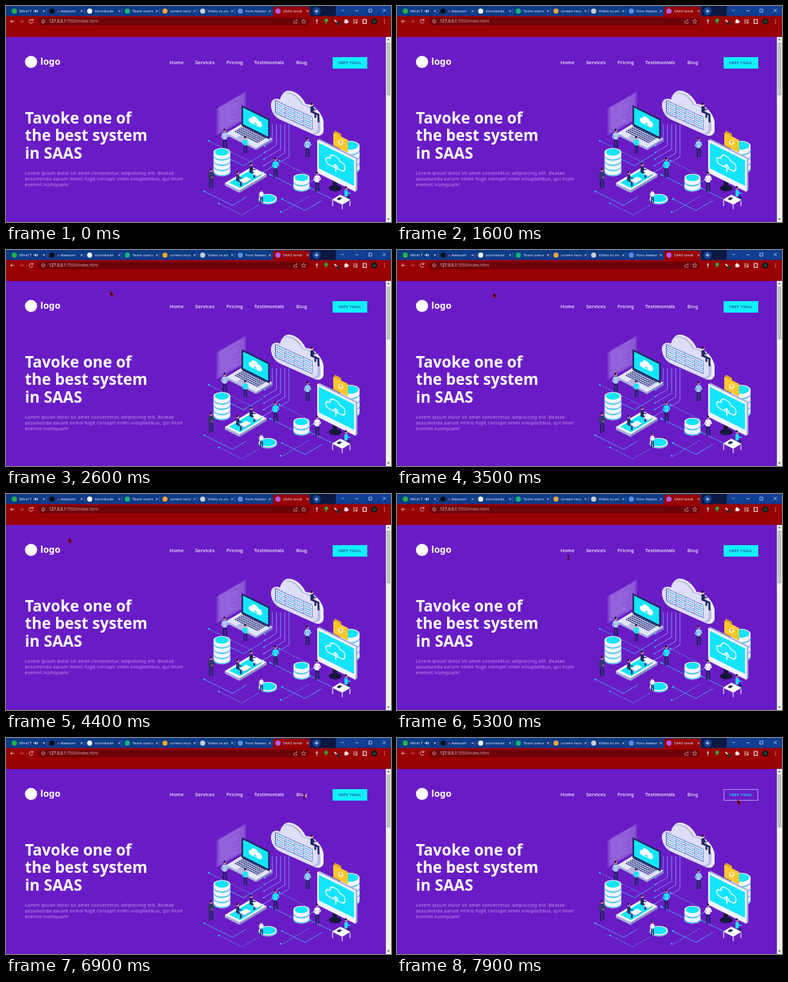
Write an HTML page that moves like this. It is 600 px wide and 338 px high and loops after 8 s.

```html
<!DOCTYPE html>
<html lang="en">
<head>
<meta charset="utf-8">
<title>SAAS landing page</title>
<style>
  html, body { margin: 0; width: 100%; height: 100%; overflow: hidden; background: #691cc5; }
  svg { display: block; width: 100%; height: 100%; font-family: "Noto Sans", "Open Sans", sans-serif; }
  .tab { font-size: 6px; fill: #dce6fb; }
  .nav { font-size: 7.2px; letter-spacing: .35px; fill: #fff; stroke: #fff; stroke-width: .15px; }
  .nav.on { fill: #14e4fa; stroke: #14e4fa; text-decoration: underline; }
  .logo { font-size: 14.4px; font-weight: 700; fill: #fff; }
  .title { font-size: 24.1px; font-weight: 700; fill: #fff; }
  .lorem { font-size: 7.2px; letter-spacing: .3px; fill: #c596ec; }
  .cta rect { fill: #10effb; stroke: #10effb; }
  .cta text { font-size: 6px; letter-spacing: .5px; fill: #24206e; }
  .cta.on rect { fill: none; stroke: #bba0ee; }
  .cta.on text { fill: #14e4fa; stroke: #14e4fa; stroke-width: .2px; }
</style>
</head>
<body>
<svg id="stage" viewBox="0 0 600 338" preserveAspectRatio="none"></svg>
<script>
const CYAN = '#14e4fa', NAVY = '#20245e', WHITE = '#f4f6ff', SHADE = '#a8acdc', RED = '#980002', ICON = '#ecd4d4';

// ---------- drawing helpers ----------
const poly = (points, fill) => `<polygon points="${points.join(' ')}" fill="${fill}"/>`;
const line = (d, stroke, w = 1, extra = '') => `<path d="${d}" fill="none" stroke="${stroke}" stroke-width="${w}" ${extra}/>`;
const rect = (x, y, w, h, fill, extra = '') => `<rect x="${x}" y="${y}" width="${w}" height="${h}" fill="${fill}" ${extra}/>`;
const dot = (x, y, r, fill) => `<circle cx="${x}" cy="${y}" r="${r}" fill="${fill}"/>`;
const oval = (x, y, rx, fill) => `<ellipse cx="${x}" cy="${y}" rx="${rx}" ry="${rx * .5}" fill="${fill}"/>`;
const text = (x, y, str, cls) => `<text x="${x}" y="${y}" class="${cls}">${str}</text>`;
const group = (transform, s) => `<g transform="${transform}">${s}</g>`;
const cross = (x, y, r, color) => line(`M${x - r} ${y - r}l${2 * r} ${2 * r}m0 ${-2 * r}l${-2 * r} ${2 * r}`, color, .8);
const range = (n, f) => Array.from({ length: n }, (_, i) => f(i)).join('');

let seed = 7;
const random = () => (seed = seed * 16807 % 2147483647) / 2147483647;

// Isometric floor: "down" runs right and down, "up" runs right and up
const DOWN = .5, UP = -.6;
const wall = (x, y, w, h, fill, slope = DOWN) =>
  poly([[x, y], [x + w, y + w * slope], [x + w, y + w * slope + h], [x, y + h]], fill);
const tile = (x, y, down, up, fill) =>
  poly([[x, y], [x + up, y + up * UP], [x + up + down, y + up * UP + down * DOWN], [x + down, y + down * DOWN]], fill);
const slab = (x, y, down, up, h, fill) =>
  wall(x, y, down, h, SHADE) + wall(x + down, y + down * DOWN, up, h, '#8d93ca', UP) + tile(x, y, down, up, fill);

// ---------- browser window ----------
function tabStrip() {
  const pitch = 58.7;
  const tabs = [['#23b24b', 'Mirel T'], ['#0b0b10', '<tspan fill="#d23c9d">●</tspan> Awesom'], ['#f2f4f8', 'tolvinkeda'],
    ['#19b27c', 'Team overv'], ['#e8a33a', 'screen reco'], ['#c9cdd4', 'Video to an'], ['#5b8de8', 'Font Aweso'], ['#b65ce8', 'SAAS landi']];
  const active = tabs.length - 1;
  return rect(0, 0, 600, 15.5, '#0d3b86') + rect(474, 0, 40, 15.5, '#0c1840') + rect(514, 0, 86, 13, '#113f94') +
    rect(416, 1, 57, 16, RED, 'rx="3"') +
    tabs.map(([color, name], i) => {
      const x = 13 + i * pitch;
      return dot(x, 8, 4, color) + text(x + 7.8, 10.4, name, 'tab') + cross(x + 46, 8, 1.5, '#dbe3f5') +
        (i < active - 1 ? rect(x + 50, 4, .6, 8, '#5575ad') : '');
    }).join('') +
    line('M43 8h1.500l2-2v4l-2-2M48.500 6q1.500 2 0 4', WHITE) +
    dot(484, 8, 6.5, '#104292') + line('M481 8h6m-3-3v6', WHITE) +
    line('M522.500 6l2 2 2-2M544.500 7.500h5M565.500 5h4.500v4.500h-4.500z', '#dfe8fa', .8) + cross(589.5, 7, 2.3, '#dfe8fa');
}

function toolbar() {
  return rect(0, 15.5, 600, 33, RED) + rect(50, 18.5, 422, 11.5, '#6d0208', 'rx="5.7"') +
    line('M13 24h-6m2.500-2.500l-2.500 2.500 2.500 2.500M41.500 22a3 3 0 1 0 .5 3M42 20v2.500h-2.500', ICON, .9) +
    line('M21 24h6m-2.500-2.500l2.500 2.500-2.500 2.500', '#c46b6b', .9) +
    line('M55.500 24a2.500 2.500 0 1 0 5 0a2.500 2.500 0 1 0-5 0m2.500-.5v2', ICON, .7) +
    '<text x="67" y="26.4" font-size="6.3" fill="#fff">127.0.0.1<tspan fill="#d2a3a5">:5500/index.html</tspan></text>' +
    line('M448.500 23v4h5v-2M450 25q0-3 4-3m-1.500-1.500l1.500 1.500-1.500 1.500', '#d8b2b4', .7) +
    line('M464 20.500l1 2.500h2.500l-2 1.800.7 2.500-2.200-1.500-2.200 1.500.7-2.500-2-1.800h2.500z', '#d8b2b4', .7) +
    rect(483, 20.5, 3, 5, '#b9a3b5', 'rx="1.5"') + line('M484.500 26v2.500', '#ddd', .8) +
    dot(499, 22.5, 2.8, '#36a83b') + line('M499 24v4', '#36a83b', 1.5) +
    line('M512 22l5 5', '#f0e8e8', 1.8) + rect(514.5, 25, 6, 4.5, '#2b2830', 'rx="1"') +
    rect(527.5, 22, 5, 5, WHITE, 'rx=".6"') + dot(530, 21.7, 1.2, WHITE) + dot(532.8, 24.5, 1.2, WHITE) +
    line('M541 22h5m-5 2.500h3.500m-3.500 2.500h2.500M547 21v5', ICON) + dot(546, 26.3, 1.2, ICON) +
    line('M556.500 21h5v6.500h-5z', WHITE, 1.2) + dot(574, 24.3, 4.7, '#16181a') + dot(574, 24.3, 2, '#22553f') +
    range(3, i => dot(590, 21.8 + i * 2.5, .7, ICON));
}

function scrollbar() {
  const arrow = (y, dir) => poly([[594, y], [598, y], [596, y + 2.5 * dir]], '#505050');
  return rect(592, 48.5, 8, 290, '#f1f1f1') + rect(593, 57, 6, 83, '#c1c1c1') + arrow(53.5, -1) + arrow(332.5, 1);
}

// ---------- illustration ----------
function head(x, y) {
  return dot(x, y, 2.2, '#f1b49b') + dot(x - .5, y - 1.2, 1.9, '#24183f');
}

// Standing figure, feet at (x, y)
function person(x, y, shirt, scale = 1) {
  return group(`translate(${x} ${y}) scale(${scale})`,
    line('M-1.700-16L-2 0M1.700-16L2.500-1', NAVY, 2.5) + rect(-3, -26, 6, 11, shirt, 'rx="1"') +
    line('M-3-25l-2 6 3 2.500M3-25l2 5-3 2', shirt, 1.7) + dot(1.8, -18, .9, '#f1b49b') + head(0, -29));
}

function seated(x, y, shirt) {
  return line(`M${x} ${y - 5}l5 2v7`, NAVY, 2.6) + rect(x - 2.5, y - 14, 5, 10, shirt, 'rx="1"') +
    line(`M${x + 1} ${y - 13}l2 4h4`, shirt, 1.7) + head(x, y - 17);
}

// Stack of discs standing on (x, y)
function drum(x, y, rx, layers, step) {
  return range(layers, i => {
    const top = y - rx / 2 - (i + 1) * step, arc = `a${rx} ${rx / 2} 0 0 0 ${2 * rx} 0`;
    return `<path d="M${x - rx} ${top}v${step - 1.5}${arc}v${1.5 - step}z" fill="${WHITE}"/>` +
      line(`M${x - rx} ${top + step - 2.5}${arc}`, '#4cbdea', 1.6) + oval(x, top, rx, WHITE) + oval(x, top, rx - 2, CYAN);
  });
}

function cloudMark(x, y, scale, fill) {
  return group(`translate(${x} ${y}) scale(${scale}) skewY(26)`,
    `<path d="M-7 5q-5 0-5-4t5-4q0-6 6-6 5 0 6 4 6-1 6 4 0 6-5 6z" fill="${fill}" stroke="#fff" stroke-width="1.2"/>` +
    line('M0 1v9M-3 4l3-3 3 3', fill === 'none' ? '#fff' : CYAN, 1.2));
}

// Floor trace: alternating down and up legs from (x, y)
function trace(x, y, legs, dashed) {
  const d = legs.map((n, i) => `l${n} ${n * (i % 2 ? UP : DOWN)}`).join('');
  return line(`M${x} ${y}${d}`, '#4fb6f2', .9, dashed ? 'stroke-dasharray="3 1.8"' : '') + dot(x, y, 1.2, CYAN);
}

function floor() {
  return trace(316, 211, [68], true) + trace(309, 290, [44, 22]) + trace(332, 309, [36, 26], true) +
    trace(412, 264, [44, 24]) + trace(426, 242, [46], true) + trace(430, 302, [36, 26]) +
    trace(428, 322, [2, 42], true) + trace(474, 285, [34]) + trace(346, 238, [24, 30]);
}

const pipes = () => range(5, i => {
  const x = 415 + i * 6.5, end = 212 + i * 6, back = 12 + i * 7;
  return line(`M${x} 185V${end}l${-back} ${-back * UP}`, '#7d8ff0', 1) + dot(x - back, end - back * UP, 1.1, CYAN);
});

function cloud() {
  const puffs = rect(2, -28, 81, 31, 'inherit', 'rx="14"') +
    [[15, -14, 14], [37, -30, 20], [63, -21, 20]].map(([x, y, r]) => dot(x, y, r, 'inherit')).join('');
  const layer = (fill, scale) => `<g fill="${fill}" transform="scale(${scale})">${puffs.replaceAll('fill="inherit"', '')}</g>`;
  return group('translate(412 168) skewY(24)',
    layer('#eef0fd', 1) + layer('#b9bbe6', .94) + layer('#dcdff6', .89) + rect(7, -24, 59, 21, '#7f86d6', 'rx="2"') +
    range(12, i => {
      const x = 9 + i % 4 * 14.3, y = -22.5 + Math.floor(i / 4) * 6.3;
      return rect(x, y, 13, 5.2, WHITE) + line(`M${x + 1} ${y + 2.6}h11`, '#2a9fe2', 2, 'stroke-dasharray="2 .8"');
    }));
}

const hologram = () => range(2, i => `<g opacity=".25">${wall(331 - i * 3, 158 + i * 3, 43, 42, '#b9a4ee', -.57)}</g>`) +
  range(13, i => {
    const x = 332 + random() * 4, w = 14 + random() * 20;
    return line(`M${x} ${161 + i * 2.8 - (x - 332) * .57}l${w} ${-w * .57}`, '#a98be6', .8, 'stroke-dasharray="5 1 3 1.5"');
  });

function laptop() {
  return slab(343, 199, 47, 25, 3, '#e2e5f8') + tile(355, 196, 38, 15, '#c3c8ec') +
    range(5, i => {
      const x = 357 + i * 3, y = 196 + i * 3 * UP;
      return line(`M${x} ${y}l36 18`, '#2b3070', 1.6, 'stroke-dasharray="2.4 .7"');
    }) +
    tile(359, 206, 11, 7, '#b3b8e2') + wall(367, 155, 44, 32, '#22275e') + wall(369.5, 159, 39, 26, CYAN) + cloudMark(389, 182, .85, '#fff');
}

function monitor() {
  return oval(513, 285, 10, '#15173a') + rect(509, 272, 7, 13, '#15173a') +
    wall(487.5, 207.5, 60, 52, SHADE) + wall(485, 209, 60, 52, WHITE) + wall(487.5, 214, 55, 40, CYAN) + cloudMark(514, 247, 1.3, 'none');
}

const folder = () => wall(512, 195, 10, 6, '#e1a51c') + wall(510, 198, 23, 20, '#f9c62f') +
  dot(521.5, 213.5, 4.2, '#fff0b8') + line('M521.500 216v-5m-2 2l2-2 2 2', '#e1a51c', 1.2);

const phone = () => slab(341, 277, 23, 42, 4, '#fff') + tile(348, 276.5, 17, 33, CYAN) +
  seated(361, 278, '#2c316f') + seated(382, 265, NAVY) +
  slab(364, 273, 8, 10, 1.5, '#fff') + slab(384, 262, 8, 8, 1.5, '#fff');

const desk = () => seated(530, 302, CYAN) +
  line('M509 304v9m15-2v7m12-13v8', '#e4e8fc', 1.3) + tile(508, 303, 16, 13, '#fff') + tile(515, 302, 4, 5, NAVY);

function illustration() {
  return floor() + pipes() + cloud() + seated(477, 171, NAVY) + line('M482 168l5 2v12', NAVY, 2.8) +
    hologram() + laptop() + person(341, 224, '#a8cdf5') + person(373, 231, CYAN, .85) +
    drum(336.5, 268, 13, 4, 8.2) + person(319.5, 286, '#343868') + phone() +
    drum(408, 312, 14, 1, 4) + person(398, 309, WHITE, .7) + person(420, 269, CYAN) + person(470, 237, '#8fd0f4', .98) +
    drum(460.5, 292, 12.5, 2, 8.5) + drum(536, 264, 15, 4, 9.5) + folder() + monitor() + person(485, 291, WHITE) + desk();
}

// ---------- page ----------
const LINKS = [[255, 276, 'Home'], [295, 325, 'Services'], [343.5, 368, 'Pricing'], [387, 434, 'Testimonials'], [452.5, 468, 'Blog']];

function page() {
  const title = ['Tavoke one of', 'the best system', 'in SAAS'];
  const lorem = ['Lorem ipsum dolor sit amet consectetur, adipisicing elit. Beatae',
    'assumenda earum nemo fugit corrupti enim voluptatibus, qui illum', 'eveniet numquam!'];
  return dot(39, 87.5, 9.5, '#fff') + text(53.5, 91.5, 'logo', 'logo') +
    LINKS.map(([x, , name]) => text(x, 91.2, name, 'nav')).join('') +
    `<g class="cta">${rect(509.5, 80.5, 53, 17, '')}${text(518, 91, 'FREE TRAIL', '')}</g>` +
    title.map((s, i) => text(29.5, 183.5 + i * 27.6, s, 'title')).join('') +
    lorem.map((s, i) => text(29.5, 264 + i * 9.1, s, 'lorem')).join('');
}

const stage = document.getElementById('stage');
stage.innerHTML = rect(0, 0, 600, 338, '#691cc5') + page() + illustration() + toolbar() + tabStrip() + scrollbar() +
  '<g id="cursor"><path id="arrow" d="M0 0v7l1.700-1.400 1.300 2.700 1.500-.7-1.200-2.500h2.200z" fill="#240814" stroke="#b30a18" stroke-width=".8"/>' +
  '<path id="beam" d="M-2-3.500h4m-2 0v7m-2 0h4" fill="none" stroke="#4a0618" stroke-width="1.5"/></g>';

// ---------- motion ----------
const LOOP = 8000, STEP = 100, LAG = 120, SWEEP = 5400;
const PATH = [ // time, x, y
  [1800, 240, 3], [2600, 162.5, 64.5], [3400, 156, 67], [4400, 97.5, 69],
  [5200, 267, 99.5], [SWEEP, 267, 99.5], [6100, 333, 98.5], [7300, 530.5, 96.5], [LOOP, 530.5, 96.5]
];

// Pointer position; sweeping along the menu it arcs up over the links
function pointer(t) {
  const i = Math.max(1, PATH.findIndex(p => p[0] >= t));
  const [t0, x0, y0] = PATH[i - 1], [t1, x1, y1] = PATH[i];
  const k = Math.max(0, (t - t0) / (t1 - t0));
  const lift = t > SWEEP && x1 > x0 ? 7 * Math.sin(Math.PI * k) : 0;
  return [x0 + (x1 - x0) * k, y0 + (y1 - y0) * k - lift];
}

const [cursor, arrow, beam] = ['cursor', 'arrow', 'beam'].map(id => document.getElementById(id));
const links = document.querySelectorAll('.nav'), cta = document.querySelector('.cta');
const show = (el, on) => el.setAttribute('visibility', on ? 'visible' : 'hidden');

function draw(now) {
  const t = Math.floor(now % LOOP / STEP) * STEP;
  const [x, y] = pointer(t), [hx, hy] = pointer(t - LAG);
  const visible = t >= PATH[0][0], overText = x > 250 && x < 480 && y > 84;
  cursor.setAttribute('transform', `translate(${x} ${y})`);
  show(arrow, visible && !overText);
  show(beam, visible && overText);
  LINKS.forEach(([a, b], i) => links[i].classList.toggle('on', hy > 84 && hy < 96 && hx > a - 2 && hx < b + 2));
  cta.classList.toggle('on', hx > 509 && hy > 80);
  requestAnimationFrame(draw);
}
requestAnimationFrame(draw);
</script>
</body>
</html>
```
